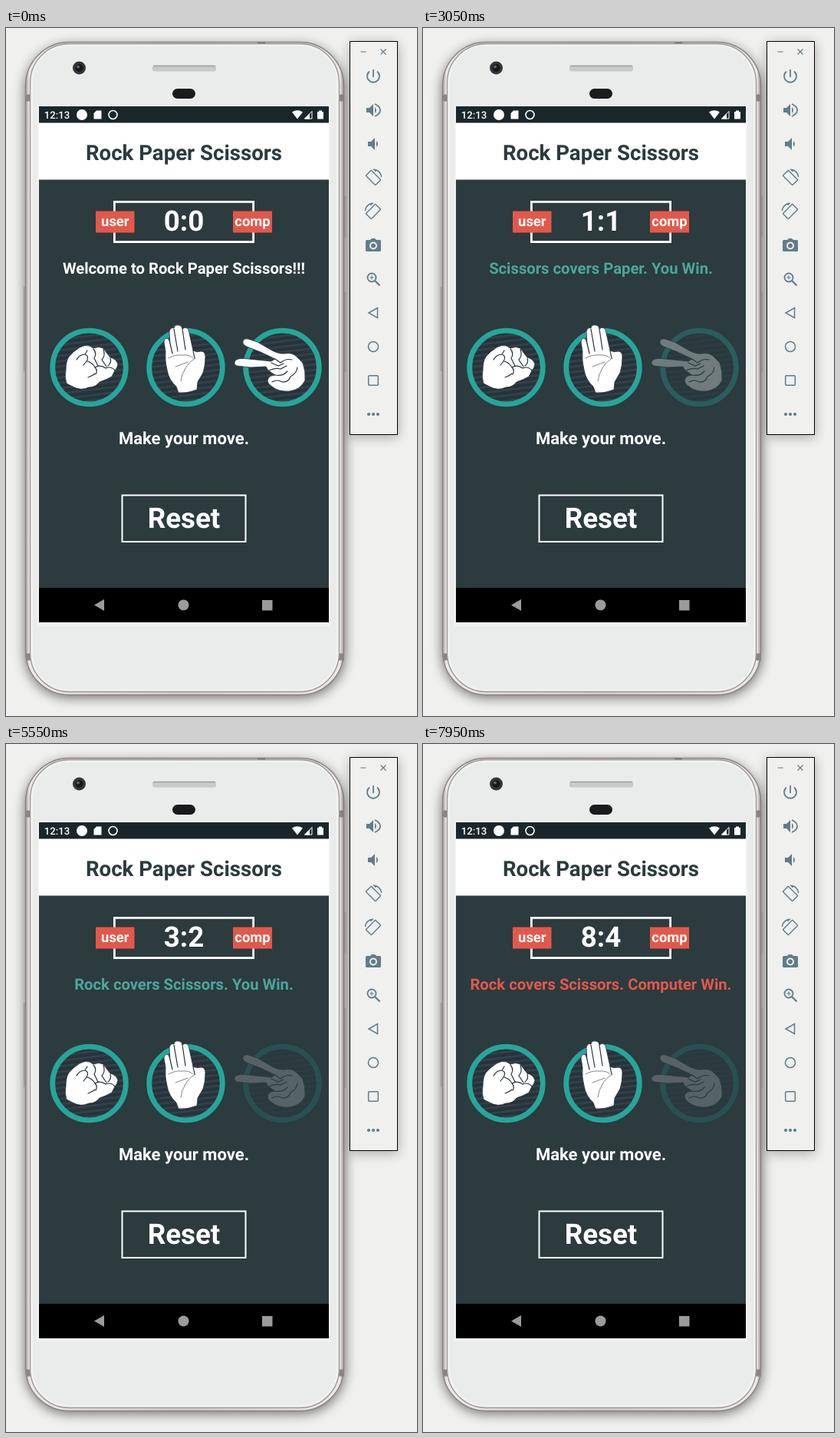
An HTML page that plays this animation: 536x896 px, repeating every 8 s.

```html
<!DOCTYPE html>
<html lang="en">
<head>
<meta charset="utf-8">
<title>Rock Paper Scissors</title>
<style>
html, body { margin: 0; width: 100%; height: 100%; overflow: hidden; background: #f0f0ef; }
svg { display: block; }
text { font: bold 20.23px Roboto, sans-serif; fill: #fff; text-anchor: middle; text-rendering: geometricPrecision; }
.label { font-size: 18.4px; }
.big { font-size: 36.8px; }
.hand { fill: #fff; stroke: #263238; stroke-width: .8; stroke-linejoin: round; }
.crease { fill: none; stroke: #29343b; stroke-width: 1.2; stroke-linecap: round; }
.fine { stroke-width: .8; opacity: .75; }
.fill { fill: #607d8b; }
.line { fill: none; stroke: #607d8b; stroke-width: 1.8; }
</style>
</head>
<body>
<svg width="536" height="896" viewBox="0 0 536 896">
  <defs>
    <filter id="blur" x="-20%" y="-20%" width="140%" height="140%"><feGaussianBlur stdDeviation="8"/></filter>
    <linearGradient id="metal">
      <stop offset="0" stop-color="#a19a98"/><stop offset=".012" stop-color="#ebe8e7"/>
      <stop offset=".5" stop-color="#d3cfcd"/>
      <stop offset=".988" stop-color="#ebe8e7"/><stop offset="1" stop-color="#a19a98"/>
    </linearGradient>
    <pattern id="stripes" width="7" height="7" patternUnits="userSpaceOnUse" patternTransform="rotate(-7)">
      <rect width="7" height="7" fill="#27333a"/><rect width="7" height="2.500" fill="#35424a"/>
    </pattern>
    <g id="ring"><circle r="47.800" fill="url(#stripes)" stroke="#26a69a" stroke-width="6.800"/></g>
    <path id="rotate" class="fill" transform="scale(.95) translate(-12 -12)" d="M16.480 2.520c3.270 1.550 5.610 4.720 5.970 8.480h1.500C23.440 4.840 18.290 0 12 0l-.66.03 3.810 3.810zM10.230 1.750c-.59-.59-1.540-.59-2.120 0L1.750 8.110c-.59.59-.59 1.540 0 2.120l12.020 12.020c.59.59 1.540.59 2.120 0l6.360-6.360c.59-.59.59-1.540 0-2.120zm4.600 19.440L2.810 9.170l6.360-6.360 12.020 12.020z"/>
  </defs>

  <!-- phone -->
  <rect x="25" y="23" width="417" height="849" rx="58" fill="#000" opacity=".55" filter="url(#blur)"/>
  <path d="M442 219v53M442 344v104M24 337v110" stroke="#a39d9b" stroke-width="2.500"/>
  <rect x="25.500" y="18.500" width="415" height="850" rx="57" fill="url(#metal)" stroke="#8a8280" stroke-width="1.300"/>
  <path d="M26 91h7M433 91h8M26 819h7M433 819h8" stroke="#8b8583" stroke-width="9"/>
  <path d="M328 19.500h10" stroke="#777" stroke-width="3"/>
  <rect x="31.500" y="20.500" width="403" height="844" rx="51" fill="#e9ecea" stroke="#9d9693" stroke-width="1.300"/>
  <rect x="34" y="23" width="398" height="839" rx="48" fill="none" stroke="#f1f3f2" stroke-width="2"/>
  <circle cx="95.500" cy="52" r="8.500" fill="#343637"/>
  <circle cx="95.500" cy="52" r="5" fill="#15191d"/><circle cx="94" cy="50.500" r="2" fill="#596570"/>
  <rect x="191" y="48.500" width="83" height="8" rx="3" fill="#c6caca"/>
  <path d="M192 49.500h81" stroke="#9fa4a4" stroke-width="1.500"/>
  <rect x="217" y="79" width="30" height="13" rx="6.500" fill="#191b1c"/>
  <rect x="41" y="100" width="382" height="679" fill="#f1f3f2"/>

  <!-- screen -->
  <rect x="43" y="102" width="378" height="672" fill="#2b3b3e"/>
  <rect x="43" y="102" width="378" height="22" fill="#1b262a"/>
  <rect x="43" y="123.500" width="378" height="74" fill="#fff"/>
  <text x="66.500" y="118" style="font-size:13.2px;font-weight:500">12:13</text>
  <g fill="#fff">
    <circle cx="99" cy="113" r="7"/>
    <path d="M118 107.500h6.500v11h-10v-7.500z"/>
    <path d="M373 109.500q7-4.500 14 0l-7 9zM406 109h2v-1.500h4v1.500h2v9.500h-8z"/>
  </g>
  <circle cx="139.500" cy="113" r="5.500" fill="none" stroke="#fff" stroke-width="1.600"/>
  <path d="M389.500 118h9.500v-9.500z" fill="none" stroke="#fff"/>
  <path d="M389 118.500h7v-7z" fill="#fff"/>
  <text x="232" y="171.500" style="font-size:27.6px;fill:#2b3b3e">Rock Paper Scissors</text>

  <rect x="141.400" y="226.400" width="181.200" height="52.200" fill="none" stroke="#fff" stroke-width="2.800"/>
  <path d="M117 238.500h50.500v28H117zM296 238.500h51v28h-51z" fill="#e2584a"/>
  <text class="label" x="142.300" y="258">user</text>
  <text class="label" x="321.500" y="258">comp</text>
  <text class="big" id="score" x="232" y="263.500"></text>
  <text id="message" x="232" y="320"></text>

  <g class="move">
    <use href="#ring" x="108.500" y="442"/>
    <path class="hand" d="M78 446Q78 434 82 428Q88 421 96 416Q103 412 109 414L114 417Q121 414 127 417L132 424L136 429Q144 431 146 438Q145 443 142 446L138 454Q131 458 122 461Q117 468 108 468Q97 473 87 467L79 463Q76 454 78 446Z"/>
    <path class="crease" d="M92 432Q96 425 103 425L106 420M103 425Q109 427 105 434L101 439M114 418Q119 424 115 430L120 440M127 418Q130 427 125 432L131 441M136 430Q138 436 133 440M106 434Q113 436 116 442Q120 446 117 451M116 442Q123 438 130 443Q137 440 142 446M107 455Q113 453 116 450"/>
  </g>
  <g class="move">
    <use href="#ring" x="234.500" y="442"/>
    <path class="hand" d="M210 445Q207 434 208 421L206 409Q207 402 212 405L214 411L213 395Q215 389 219 391Q220 386 225 387Q229 387 230 392Q235 388 238 393L244 420Q249 423 254 421Q260 421 260 428Q260 440 257 449L250 461L249 471Q237 476 225 475L222 467Q212 458 210 445Z"/>
    <path class="crease" d="M214 411L217 424M219 392L224 421M230 392L234 419M244 420L246 430"/>
    <path class="crease fine" d="M212 430Q220 425 230 426Q239 425 244 430M247 430Q237 436 233 445M221 441Q229 438 237 435M233 445Q229 451 228 460"/>
  </g>
  <g class="move">
    <use href="#ring" x="360.500" y="442"/>
    <path class="hand" d="M309 408Q310 404 316 405L328 409L347 420Q356 425 363 424Q373 422 379 428L387 436Q391 447 390 459Q384 471 370 473Q355 474 347 467Q339 462 342 456Q345 452 351 452L342 446L339 441L319 442L301 440Q296 438 299 433Q304 429 316 431L346 434L351 431L332 422L314 415Q308 412 309 408Z"/>
    <path class="crease" d="M351 431L358 436Q365 430 373 432M346 436L355 440L362 437M343 446Q351 442 358 444L366 440M351 452Q361 454 367 447M347 461Q354 457 360 461Q368 462 371 454Q379 450 380 442"/>
  </g>

  <text x="232" y="541.500" style="font-size:22.07px">Make your move.</text>
  <rect x="151.500" y="608.500" width="161" height="60.500" fill="none" stroke="#fff" stroke-width="2"/>
  <text class="big" x="232" y="651">Reset</text>
  <rect x="43" y="729" width="378" height="45" fill="#000"/>
  <g fill="#9b9b9b"><path d="M115 751.500l13-7.500v15z"/><circle cx="231.500" cy="751.500" r="7"/><rect x="334" y="745" width="13.500" height="13.500"/></g>

  <!-- toolbar -->
  <rect x="449" y="20" width="62" height="513" fill="#000" opacity=".3" filter="url(#blur)"/>
  <rect x="448.500" y="17.500" width="62" height="512" fill="#f0f0ef" stroke="#000"/>
  <path d="M462.500 31h7M488.500 27.500l7 7m0-7l-7 7" class="line" style="stroke-width:1.2"/>
  <path transform="translate(479 63)" class="line" d="M0-9V1M-5-6.500A8 8 0 1 0 5-6.500" stroke-width="2"/>
  <g transform="translate(479 107)">
    <path class="fill" d="M-9-3h4l5-5V8L-5 3h-4zM2-4q4 4 0 8z"/><path class="line" d="M2-8Q9-5 9 0T2 8"/>
  </g>
  <path transform="translate(479 151)" class="fill" d="M-7-3h4l5-5V8L-3 3h-4zM4-4q4 4 0 8z"/>
  <use href="#rotate" x="479" y="195"/>
  <use href="#rotate" transform="translate(479 239) scale(-1 1)"/>
  <g transform="translate(479 283)">
    <path class="fill" d="M-8.500-7h4.500l2-2h4l2 2h4.500q1.500 0 1.500 1.500v12q0 1.500-1.500 1.500h-17q-1.500 0-1.500-1.500v-12q0-1.500 1.500-1.500z"/>
    <circle r="4" cy=".5" fill="#607d8b" stroke="#f0f0ef" stroke-width="2"/>
  </g>
  <g transform="translate(479 327)" class="line">
    <circle cx="-2" cy="-2" r="5.500"/><path d="M2 2l6.500 6.500" stroke-width="2.300"/><path d="M-4.500-2h5M-2-4.500v5" stroke-width="1.200"/>
  </g>
  <path d="M473 371l11.500-6.500v13z" class="line" style="stroke-width:1.5"/>
  <circle cx="479" cy="415" r="6.500" class="line" style="stroke-width:1.5"/>
  <rect x="472.700" y="452.700" width="12.600" height="12.600" rx="1" class="line" style="stroke-width:1.5"/>
  <g class="fill"><circle cx="473" cy="503" r="2.100"/><circle cx="479" cy="503" r="2.100"/><circle cx="485" cy="503" r="2.100"/></g>
</svg>
<script>
const LOOP = 8000, STEP = 50, FADE = 250, DIM = 0.2;
const ROCK = 0, PAPER = 1, SCISSORS = 2;
// button, pressed at, fade starts at, result shown at, score, message
const rounds = [
  [ROCK, 1200, 1300, 1350, '0:1', 'Paper covers Rock. Computer Win.'],
  [PAPER, 2050, 2238, 2200, '0:1', 'Paper with Paper. Draw.'],
  [SCISSORS, 2750, 2980, 2950, '1:1', 'Scissors covers Paper. You Win.'],
  [PAPER, 3600, 3870, 3950, '2:1', 'Paper covers Rock. You Win.'],
  [PAPER, 4350, 4530, 4550, '2:2', 'Scissors covers Paper. Computer Win.'],
  [ROCK, 4950, 5100, 5150, '3:2', 'Rock covers Scissors. You Win.'],
  [SCISSORS, 5550, 5580, 5600, '3:3', 'Rock covers Scissors. Computer Win.'],
  [PAPER, 5900, 6000, 6050, '4:3', 'Paper covers Rock. You Win.'],
  [ROCK, 6350, 6390, 6450, '5:3', 'Rock covers Scissors. You Win.'],
  [SCISSORS, 6800, 6988, 7000, '6:3', 'Scissors covers Paper. You Win.'],
  [PAPER, 7150, 7260, 7300, '7:3', 'Paper covers Rock. You Win.'],
  [ROCK, 7550, 7620, 7700, '8:3', 'Rock covers Scissors. You Win.'],
  [SCISSORS, 7800, 8000, 7950, '8:4', 'Rock covers Scissors. Computer Win.']
];
const moves = document.querySelectorAll('.move');
const score = document.getElementById('score');
const message = document.getElementById('message');

const ease = x => x < 0.5 ? 2 * x * x : 1 - 2 * (1 - x) ** 2;
const clamp = x => Math.min(1, Math.max(0, x));

function colour(text) {
  if (text.endsWith('You Win.')) return '#4ca798';
  return text.endsWith('Computer Win.') ? '#e2584a' : '#fff';
}

function draw(t) {
  const opacity = [1, 1, 1];
  let points = '0:0', text = 'Welcome to Rock Paper Scissors!!!';
  for (const [button, press, fade, shown, total, result] of rounds) {
    if (t >= press) opacity[button] = DIM + (1 - DIM) * ease(clamp((t - fade) / FADE));
    if (t >= shown) [points, text] = [total, result];
  }
  moves.forEach((move, i) => move.setAttribute('opacity', opacity[i]));
  score.textContent = points;
  message.textContent = text;
  message.style.fill = colour(text);
}

const start = performance.now();
function tick() {
  const t = (performance.now() - start) % LOOP;
  draw(Math.floor(t / STEP) * STEP);
  requestAnimationFrame(tick);
}
tick();
</script>
</body>
</html>
```
